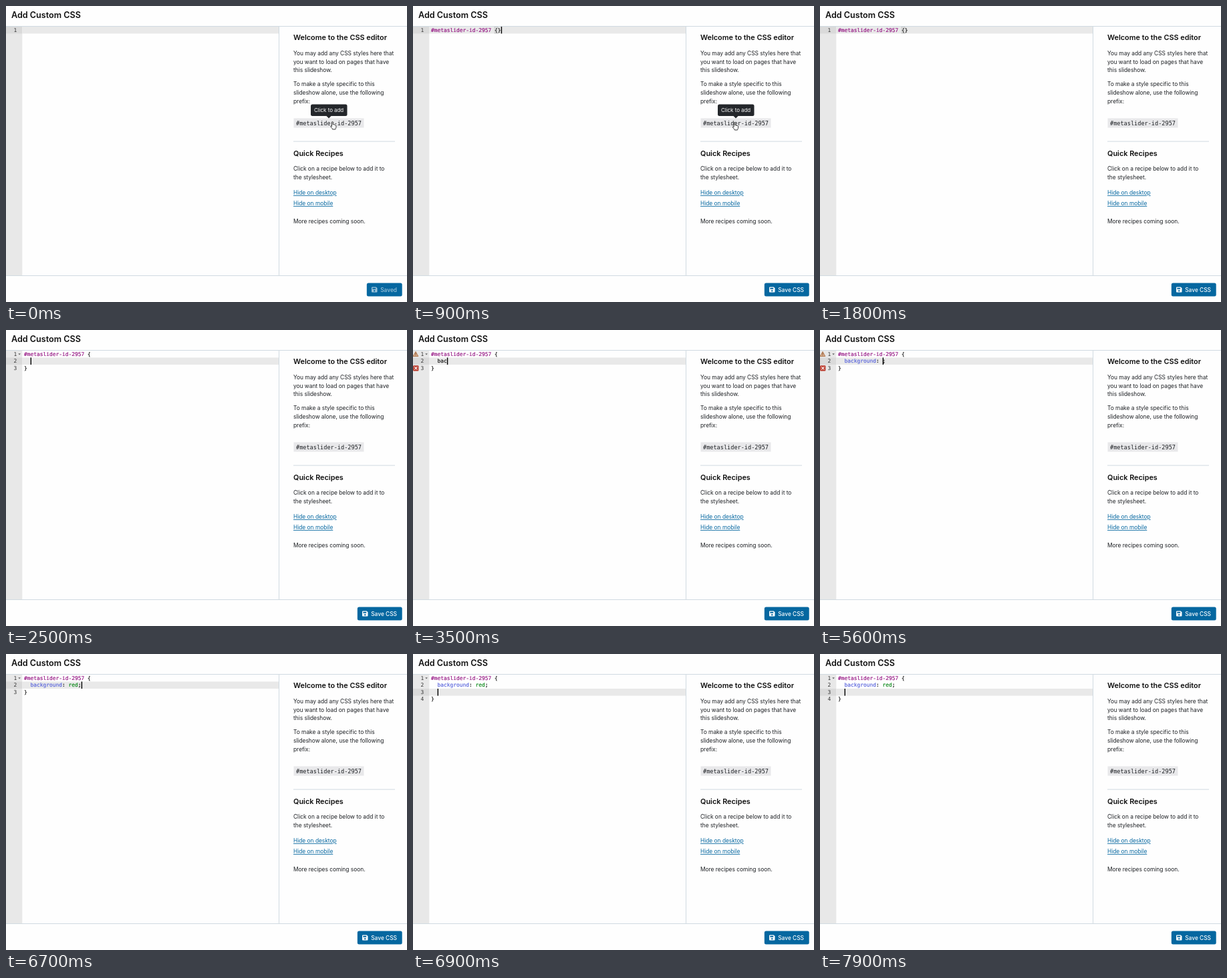
These frames come from a looping animation (600x444 px, 8 s). An HTML page:

```html
<!DOCTYPE html>
<html lang="en">
<head>
<meta charset="utf-8">
<title>Custom CSS editor</title>
<style>
html, body { margin: 0; width: 100%; height: 100%; overflow: hidden; background: #fefefe; }
svg { display: block; width: 100vw; height: 100vh; }
text { font: 8.37px Inter, sans-serif; fill: #1c1f23; white-space: pre; }
.title { font-size: 12.58px; font-weight: 600; fill: #111; }
.head { font-size: 10.87px; font-weight: 600; fill: #111; }
.link { fill: #0567a0; text-decoration: underline; }
.tip { font-size: 7.9px; fill: #fff; }
.btn { font-size: 8.4px; font-weight: 500; fill: #fff; }
.mono { font: 8.57px "DejaVu Sans Mono", monospace; }
.code text { font: 7.9px "DejaVu Sans Mono", monospace; fill: #111; stroke: #111; stroke-width: .15px; }
.code .num { fill: #333; stroke: none; text-anchor: end; }
.code .sel { fill: #930f80; stroke: #930f80; }
.code .prop { fill: #5560dc; stroke: #5560dc; }
.code .val { fill: #068614; stroke: #068614; }
</style>
</head>
<body>
<svg viewBox="0 0 600 444">
  <rect width="600" height="444" fill="#fefefe"/>
  <text class="title" x="8" y="18.4">Add Custom CSS</text>
  <rect y="31" width="24.3" height="373" fill="#e8e8e8"/>
  <g id="code" class="code"></g>
  <path d="M0 30.5H600M408.5 31V404M0 404.5H600M430 203.1H582" stroke="#d0dae1"/>

  <text class="head" x="430" y="51.4">Welcome to the CSS editor</text>
  <g id="copy"></g>
  <rect x="430.5" y="168.5" width="105" height="14" fill="#e8e8ea"/>
  <text class="mono" x="434" y="179">#metaslider-id-2957</text>
  <text class="head" x="430" y="224.8">Quick Recipes</text>
  <text class="link" x="430" y="283">Hide on desktop</text>
  <text class="link" x="430" y="299">Hide on mobile</text>

  <g id="tip">
    <rect x="456" y="147.5" width="54.5" height="17.5" rx="2.5" fill="#24272b"/>
    <path d="M479.5 165h7l-3.5 3.6z" fill="#24272b"/>
    <text class="tip" x="461" y="159.2">Click to add</text>
  </g>
  <path id="hand" fill="#fff" stroke="#222" stroke-width=".9" stroke-linejoin="round"
    d="M2.8 7.6V1.5a.9.9 0 0 1 1.8 0V5c.3-.7 1.6-.6 1.7.2.4-.5 1.5-.3 1.5.5.5-.4 1.4-.1 1.4.8v2.3c0 1.6-1 2-1 3.2H3.9c0-1.2-1.7-2.3-2.7-4C.6 7 1.8 6.4 2.8 7.6z"/>

  <rect id="button" y="415.6" height="20" rx="2.5" fill="#0567a0"/>
  <g id="label">
    <path fill="#fff" fill-rule="evenodd" d="M1 421.5h5.7l1.8 1.8v5.2a1 1 0 0 1-1 1H1a1 1 0 0 1-1-1v-6a1 1 0 0 1 1-1zM1.3 422.7v2h4.9v-2zM4.25 426a1.2 1.2 0 1 0 .01 0z"/>
    <text id="caption" class="btn" x="13.2" y="428.8"></text>
  </g>
</svg>
<script>
const $ = id => document.getElementById(id);
const LOOP = 8000, LEFT = 27, CHAR = 4.756, TOP = 30.8, ROW = 10.6;

[[74, 'You may add any CSS styles here that'], [86.7, 'you want to load on pages that have'],
 [99.3, 'this slideshow.'], [120.4, 'To make a style specific to this'],
 [133, 'slideshow alone, use the following'], [145.6, 'prefix:'],
 [247.1, 'Click on a recipe below to add it to'], [259.9, 'the stylesheet.'],
 [326.4, 'More recipes coming soon.']
].forEach(([y, s]) => $('copy').innerHTML += `<text x="430" y="${y}">${s}</text>`);

// Editor contents over time: | is a visible caret, ^ a hidden one
const rule = '#metaslider-id-2957 {';
const block = body => `${rule}\n  ${body}\n}`;
const steps = [[0, '^'], [100, '|'], [700, '^'], [900, rule + '}|'], [1800, rule + '}^'],
  [2000, rule + '|}'], [2500, block('|')]];
[2900, 3200, 3500, 3700, 3900, 4100, 4300, 4400, 4500, 4600].forEach((t, i) =>
  steps.push([t, block('background'.slice(0, i + 1) + '|')]));
[[5100, '^'], [5400, ':|;'], [5600, ': |;'], [5700, ': r|;'], [5800, ': re|;'],
 [6000, ': red|;'], [6600, ': red^;'], [6700, ': red;|'], [6900, ': red;\n  |'],
 [7500, ': red;\n  ^'], [7900, ': red;\n  |']
].forEach(([t, s]) => steps.push([t, block('background' + s)]));

const rect = (x, y, w, h, fill, more = '') =>
  `<rect x="${x}" y="${y}" width="${w}" height="${h}" fill="${fill}" ${more}/>`;
const paint = s => s
  .replace(/#\S+/, '<tspan class="sel">$&</tspan>')
  .replace('background', '<tspan class="prop">$&</tspan>')
  .replace(/\bred\b/, '<tspan class="val">$&</tspan>');

function editor(source, warn, error) {
  const lines = source.split('\n');
  const row = lines.findIndex(s => /[|^]/.test(s));
  const col = lines[row].search(/[|^]/);
  const y = TOP + row * ROW;
  let out = rect(0, y, 24.3, ROW, '#dadada') + rect(24.3, y, 383.7, ROW, '#e9e9e9');
  const pair = /\{\}[|^]/.test(source) ? col - 2 : source.includes('{|}') ? col : -1;
  if (pair >= 0)
    out += rect(LEFT + pair * CHAR, y + .4, CHAR, ROW - .8, 'none', 'stroke="#b8b8b8" stroke-width=".7"');
  lines.forEach((s, i) => {
    const base = TOP + i * ROW + 7.8;
    out += `<text class="num" x="16.2" y="${base}">${i + 1}</text>` +
      `<text x="${LEFT}" y="${base}">${paint(s.replace(/[|^]/, ''))}</text>`;
  });
  if (lines.length > 1) out += '<path d="M18.3 35.2h3.6l-1.8 2.2z" fill="#666"/>';
  if (warn) out += '<path d="M4 32.5L7.8 39.4H.2z" fill="#dcb79a" stroke="#a8683c" stroke-width=".9" stroke-linejoin="round"/>' +
    '<path d="M4 34.6v2.3M4 37.6v.9" stroke="#7a3c14"/>';
  if (error) out += rect(.2, 53.2, 8.2, 8.2, '#bb3a2c', 'rx="1"') +
    '<path d="M2.2 55.2l4.2 4.2m0-4.2l-4.2 4.2" stroke="#fff" stroke-width="1.1"/>';
  if (source.includes('|')) out += rect(LEFT + .1 + col * CHAR, y, 1.4, ROW, '#000');
  return out;
}

let shown;
function draw(now) {
  const t = now % LOOP;
  const source = steps.findLast(s => s[0] <= t)[1];
  const warn = t >= 3000 && t < 5800, error = t >= 3500 && t < 5800;
  const key = source + warn + error;
  if (key !== shown) $('code').innerHTML = editor(source, warn, error);
  shown = key;

  const away = Math.min(1, Math.max(0, (t - 1000) / 400));
  $('tip').setAttribute('opacity', Math.max(0, 1 - away * 2));
  $('hand').setAttribute('visibility', away < 1 ? 'visible' : 'hidden');
  $('hand').setAttribute('transform', t < 100 ? 'translate(484.7 173)'
    : `translate(${477.3 - 50 * away * away} ${174 + 14 * away * away})`);

  const saved = t < 900, x = saved ? 539.8 : 525.8;
  $('button').setAttribute('x', x);
  $('button').setAttribute('width', 592.7 - x);
  $('label').setAttribute('transform', `translate(${x + 7.2} 0)`);
  $('label').setAttribute('opacity', saved ? .6 : 1);
  $('caption').textContent = saved ? 'Saved' : 'Save CSS';
}

const start = performance.now();
(function tick() {
  draw(performance.now() - start);
  requestAnimationFrame(tick);
})();
</script>
</body>
</html>
```
